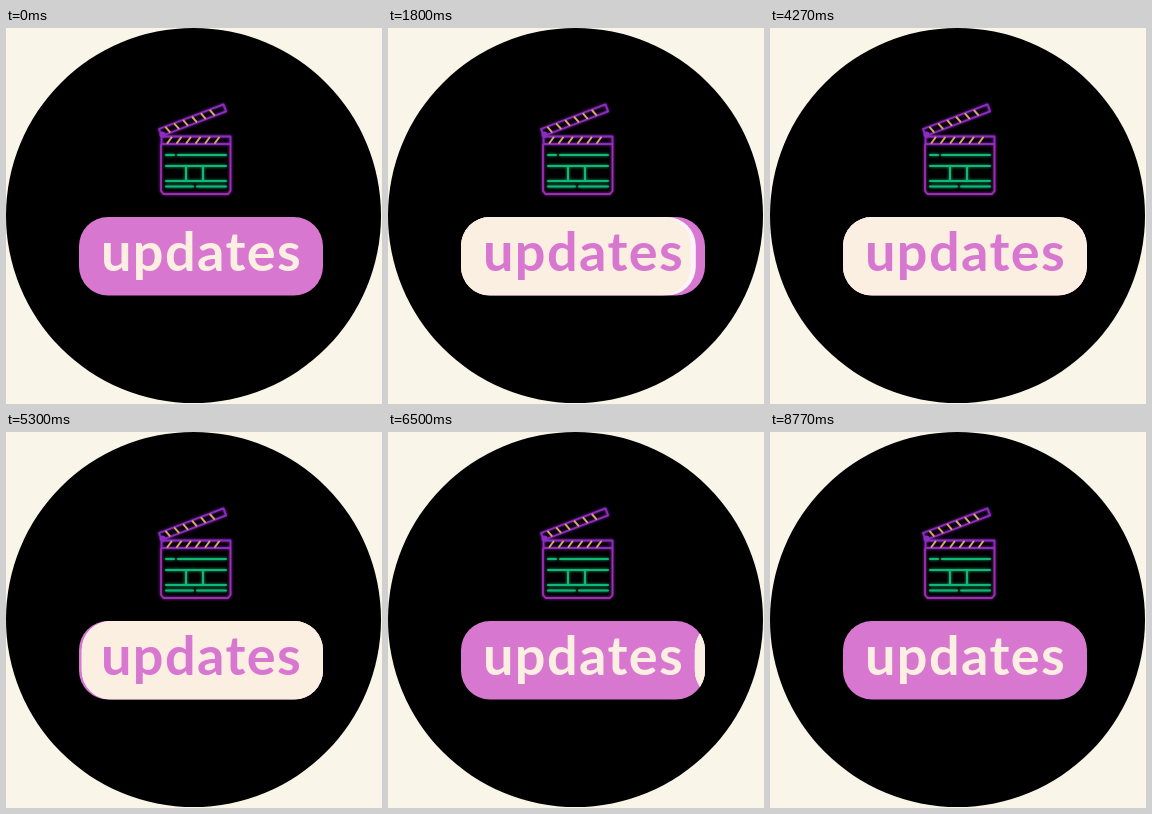
An HTML page with a canvas that plays this animation: 376x376 px, repeating every 9.43 s.

```html
<!DOCTYPE html>
<html lang="en">
<head>
<meta charset="utf-8">
<title>updates</title>
<style>
html, body { margin: 0; width: 100%; height: 100%; overflow: hidden; background: #f9f5e8; }
canvas { display: block; width: 376px; height: 376px; }
</style>
</head>
<body>
<canvas id="stage" width="376" height="376"></canvas>
<script>
const ctx = document.getElementById('stage').getContext('2d');
const LOOP = 9430;
const SWEEP = 2230, ENTER_AT = 155, LEAVE_AT = ENTER_AT + LOOP / 2;
const PINK = '#d777d0', CREAM = '#fbefe2', PAPER = '#f9f5e8', WHITE = '#fdf3fb';
const PURPLE = '#8d2cc0', MAGENTA = '#9a2fb4', GREEN = '#10b878', GOLD = '#d6a765';
const PILL = { x: 73, y: 189, w: 244, h: 78.5, r: 29 };

const clamp = v => Math.min(1, Math.max(0, v));
const phase = (t, start, length) => clamp((t - start) / length);
const easeInOut = u => u < 0.5 ? 8 * u ** 4 : 1 - 8 * (1 - u) ** 4;
const lerp = (a, b, u) => a + (b - a) * u;

function pillPath(left, right) {
  ctx.beginPath();
  ctx.roundRect(left, PILL.y, right - left, PILL.h, PILL.r);
}

function fillPill(left, right, color) {
  pillPath(left, right);
  ctx.fillStyle = color;
  ctx.fill();
}

function lines(color, width, ...paths) {
  ctx.strokeStyle = color;
  ctx.lineWidth = width;
  ctx.beginPath();
  for (const [x, y, ...rest] of paths) {
    ctx.moveTo(x, y);
    for (let i = 0; i < rest.length; i += 2) ctx.lineTo(rest[i], rest[i + 1]);
  }
  ctx.stroke();
}

// Outlined bar with slanted stripes, drawn from its left end.
function stick(x, y, angle, length, lean) {
  ctx.save();
  ctx.translate(x, y);
  ctx.rotate(angle);
  ctx.shadowColor = PURPLE;
  ctx.shadowBlur = 3;
  lines(PURPLE, 1.8, [0, 0, length, 0, length, 7.5, 0, 7.5, 0, 0]);
  ctx.shadowBlur = 0;
  for (let s = 8; s < length - 4; s += 9.5) {
    lines(GOLD, 2, [s + lean, 1, s - lean, 6.5]);
  }
  ctx.restore();
}

function clapper() {
  ctx.save();
  ctx.lineCap = 'round';
  ctx.lineJoin = 'round';
  stick(153, 101, -0.365, 69, -1);
  stick(155.5, 108.5, 0, 69, 2);
  ctx.fillStyle = PURPLE;
  ctx.beginPath();
  ctx.arc(156.5, 106.5, 3, 0, Math.PI * 2);
  ctx.fill();

  ctx.shadowColor = MAGENTA;
  ctx.shadowBlur = 3;
  lines(MAGENTA, 1.8,
    [155, 117, 155, 163, 157.5, 166, 222, 166, 224.5, 163, 224.5, 117]);

  ctx.shadowColor = GREEN;
  lines(GREEN, 2,
    [160, 127, 168, 127], [172, 127, 220, 127],
    [160, 138, 220, 138],
    [180, 138, 180, 153], [197, 138, 197, 153],
    [160, 153, 220, 153],
    [160, 158.5, 187, 158.5], [191, 158.5, 220, 158.5]);
  ctx.restore();
}

// Limits drawing to one side of a slanted line crossing the word's middle at x.
function clipSlant(x, side) {
  const midY = 225, reach = 100, slope = 3.3;
  const far = side * 1000;
  ctx.beginPath();
  ctx.moveTo(x + reach * slope, midY - reach);
  ctx.lineTo(x - reach * slope, midY + reach);
  ctx.lineTo(x - reach * slope + far, midY + reach);
  ctx.lineTo(x + reach * slope + far, midY - reach);
  ctx.clip();
}

// The colour change runs over the word from corner to corner.
function label(enter, leave) {
  ctx.font = 'bold 54px Lato, "Open Sans", sans-serif';
  ctx.letterSpacing = '1.4px';
  ctx.textAlign = 'center';
  const leaving = leave > 0;
  const x = lerp(-35, 425, leaving ? leave : enter);
  for (const side of [-1, 1]) {
    ctx.save();
    clipSlant(x, side);
    ctx.fillStyle = (side < 0) === leaving ? CREAM : PINK;
    ctx.fillText('updates', 195.5, 243);
    ctx.restore();
  }
}

function draw(t) {
  const enter = easeInOut(phase(t, ENTER_AT, SWEEP));
  const leave = easeInOut(phase(t, LEAVE_AT, SWEEP));
  const lag = 5 * Math.sin(Math.PI * phase(t, 1500, 700));

  ctx.fillStyle = PAPER;
  ctx.fillRect(0, 0, 376, 376);
  ctx.fillStyle = '#000';
  ctx.beginPath();
  ctx.arc(187.5, 187.5, 187.5, 0, Math.PI * 2);
  ctx.fill();
  clapper();

  const end = PILL.x + PILL.w;
  fillPill(PILL.x, end, PINK);
  if (enter > 0 && leave < 1) {
    const left = leave > 0 ? PILL.x + PILL.w * leave : PILL.x - PILL.w;
    const right = leave > 0 ? end + PILL.w : PILL.x + PILL.w * enter;
    ctx.save();
    pillPath(PILL.x, end);
    ctx.clip();
    fillPill(left, right, WHITE);
    fillPill(left, right - lag, CREAM);
    ctx.restore();
  }
  label(enter, leave);
}

function frame() {
  draw(performance.now() % LOOP);
  requestAnimationFrame(frame);
}
frame();
</script>
</body>
</html>
```
